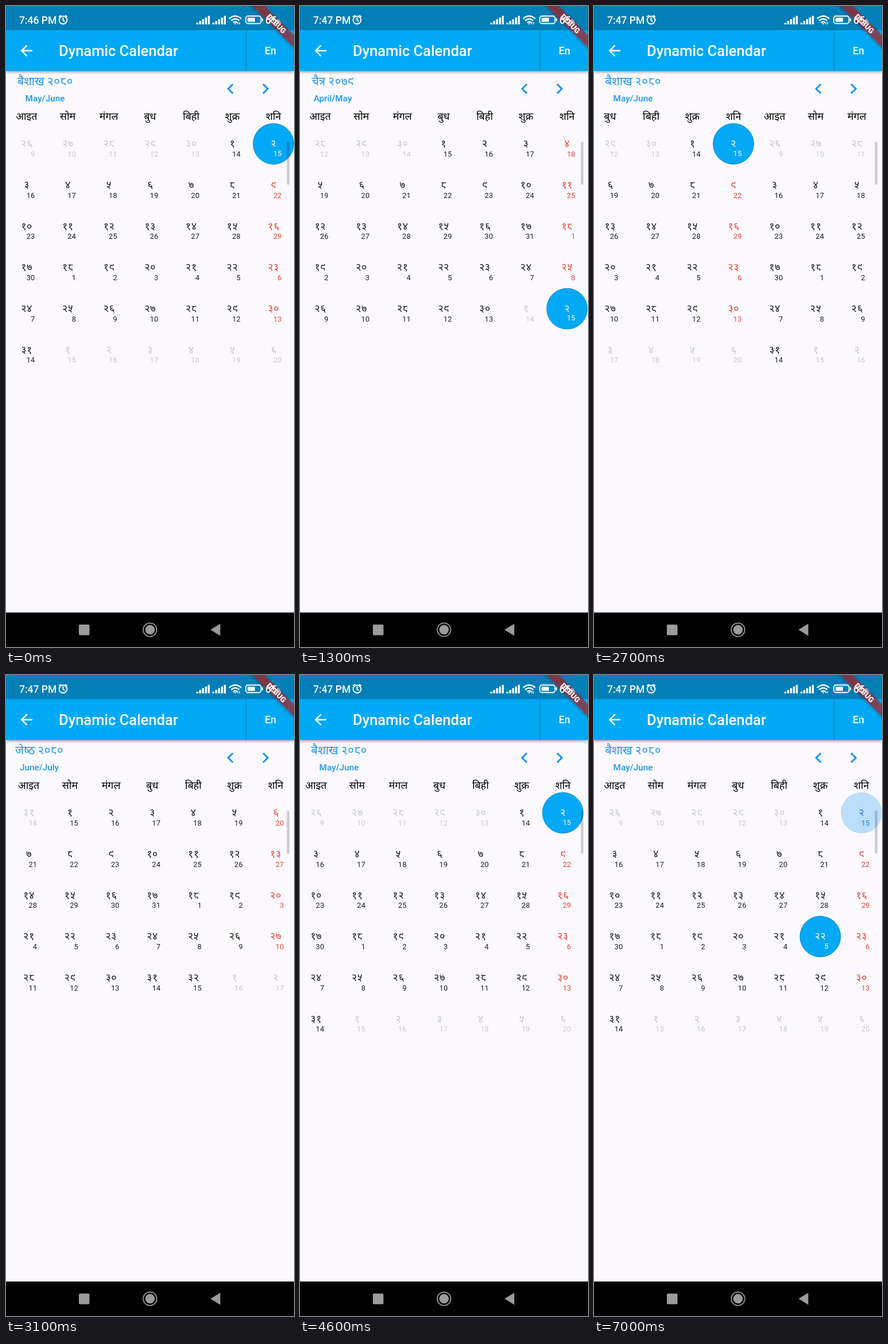
An HTML page for the animation above (8 s loop, 502 px wide and 1115 px high).

```html
<!DOCTYPE html>
<html lang="ne">
<head>
<meta charset="utf-8">
<style>
html, body { margin: 0; width: 100%; height: 100%; overflow: hidden; background: #fbf9fd; }
svg { display: block; width: 502px; height: 1115px; font-family: Roboto, "Noto Sans Devanagari", "Noto Sans", sans-serif; }
.mid, .day { text-anchor: middle; }
.day { font-size: 17.9px; }
.date { font-size: 12.8px; text-anchor: end; letter-spacing: .2px; }
.medium { font-weight: 500; }
.dark { fill: #1c1c1e; }
.faded { fill: #c9c8cb; }
.red { fill: #e8443a; }
.white { fill: #fff; }
.today { fill: #1976d2; }
</style>
</head>
<body>
<svg viewBox="0 0 502 1115">
  <defs>
    <filter id="shadow" x="-20%" y="-40%" width="140%" height="200%"><feDropShadow dx="0" dy="2" stdDeviation="2.5" flood-opacity=".4"/></filter>
    <g id="bars"><path d="M1.5 32v-3M6.5 32v-6M11.5 32v-9M16.500 32v-12M21.500 32v-15" stroke="#fff" stroke-width="3.4"/></g>
  </defs>
  <rect width="502" height="1115" fill="#fbf9fd"/>
  <g id="pager"></g>
  <rect x="489.500" y="236" width="4.500" height="75" rx="2" fill="#000" fill-opacity=".18"/>

  <g fill="#2196f3" class="mid">
    <text id="title" y="138" font-size="20.4"></text>
    <text id="span" y="165.500" font-size="15.3" class="medium"></text>
    <path transform="translate(372.600 125.400) scale(1.55)" d="M15.410 7.410L14 6l-6 6 6 6 1.410-1.410L10.830 12z"/>
    <path transform="translate(433.700 125.400) scale(1.55)" d="M10 6L8.590 7.410 13.170 12l-4.580 4.590L10 18l6-6z"/>
  </g>

  <rect y="0" width="502" height="113" fill="#03a9f4" filter="url(#shadow)"/>
  <g id="app-bar">
    <svg y="42" width="502" height="71" viewBox="0 42 502 71">
      <rect x="420" y="42" width="90" height="71" rx="2" fill="#03a9f4" filter="url(#shadow)"/>
    </svg>
    <rect width="502" height="42" fill="#027fb7"/>
    <path class="white" transform="translate(20.400 62.400) scale(1.278)" d="M20 11H7.830l5.590-5.590L12 4l-8 8 8 8 1.410-1.410L7.830 13H20z"/>
    <text x="92" y="87" font-size="25.56" class="medium white">Dynamic Calendar</text>
    <text x="461" y="84" font-size="17.9" class="medium white mid">En</text>
  </g>

  <g transform="translate(502 0) rotate(45)">
    <rect x="-60" y="35.800" width="120" height="15.3" fill="#b71c1c" fill-opacity=".63" filter="url(#shadow)"/>
    <text y="48" font-size="13" font-weight="900" class="white mid">DEBUG</text>
  </g>

  <g id="status" fill="none" stroke="#fff" stroke-width="2">
    <text id="clock" x="23" y="31" font-size="17.5" class="medium white" stroke="none"></text>
    <circle cx="99.500" cy="24.500" r="6.800"/>
    <path d="M99.500 20v5l3 2M92 19l4-3M107 19l-4-3"/>
    <use href="#bars" x="332"/><use href="#bars" x="360"/>
    <path d="M389 22q10.500-9 21 0M392.500 25.500q7-6 14 0M396 29q3.500-3 7 0" stroke-width="2.400"/>
    <path d="M397.500 30h4l-2 2.500z" fill="#fff" stroke="none"/>
    <path d="M404 32v-4M407 28v4" stroke-width="1.300"/>
    <rect x="418" y="17.500" width="26.500" height="13" rx="3.500" stroke-width="1.800"/>
    <rect x="421" y="20.500" width="13" height="7" rx="1" fill="#fff" stroke="none"/>
    <path d="M447 21.500v5"/>
    <text x="452" y="31" font-size="17.5" class="medium white" stroke="none">65<tspan font-size="10">%</tspan></text>
  </g>

  <rect y="1055" width="502" height="60"/>
  <g fill="#9b9b9b">
    <rect x="127" y="1076" width="18.500" height="18.500" rx="2"/>
    <circle cx="251" cy="1085" r="8.300"/>
    <circle cx="251" cy="1085" r="11.700" fill="none" stroke="#9b9b9b" stroke-width="1.800"/>
    <path d="M356.500 1085l17-10.500v21z"/>
  </g>
</svg>
<script>
const LOOP = 8000, WIDTH = 502, CELL = WIDTH / 7;
const WEEKDAYS = ["आइत", "सोम", "मंगल", "बुध", "बिही", "शुक्र", "शनि"];
const MONTHS = [
  { title: "चैत्र २०७९", span: "April/May", center: 57, lead: 3, prevLast: 30, days: 30, cells: 35, date: 12, wrap: 31, today: 34 },
  { title: "बैशाख २०८०", span: "May/June", center: 68, lead: 5, prevLast: 30, days: 31, cells: 42, date: 9, wrap: 30, today: 6, pick: 26 },
  { title: "जेष्ठ २०८०", span: "June/July", center: 58, lead: 1, prevLast: 31, days: 32, cells: 35, date: 14, wrap: 31 }
];
// Each swipe: finger down, release (ms), page before, page after.
const SWIPES = [[50, 596, 1, 0], [1920, 1985, 0, 1], [2610, 2696, 1, 2], [4122, 4232, 2, 1]];
const DRAG = 0.4, SLOW = 9.1, FAST = 22;
const PICK_START = 6120, PICK_END = 6290, MINUTE = 600;

const $ = id => document.getElementById(id);
const nepali = n => String(n).replace(/\d/g, d => String.fromCharCode(0x966 + +d));
const text = (x, y, cls, str) => `<text x="${x.toFixed(2)}" y="${y.toFixed(2)}" class="${cls}">${str}</text>`;
const columnX = c => (c + 0.5) * CELL;

function cellText(x, y, day, date, color, lift = 0) {
  return text(x, y + 5.5, "day " + color, nepali(day)) + text(x + 14.6, y + 22 - lift, "date " + color, date);
}

function monthMarkup(m) {
  let out = WEEKDAYS.map((w, c) => text(columnX(c), 198, "day medium", w)).join("");
  for (let i = 0; i < m.cells; i++) {
    const x = columnX(i % 7), y = 239.8 + Math.floor(i / 7) * 71.7;
    const n = i - m.lead + 1, inside = n > 0 && n <= m.days;
    const day = n < 1 ? m.prevLast + n : inside ? n : n - m.days;
    const date = (m.date + i - 1) % m.wrap + 1;
    const disc = (r, attrs) => `<circle cx="${x}" cy="${y}" r="${r}" ${attrs}/>`;
    const cell = (color, lift) => cellText(x, y, day, date, color, lift);
    const selected = disc(35.4, 'fill="#03a9f4" stroke="#0288d1"') + cell("white", 1.2);
    if (i === m.today) {
      out += `<g class="before">${selected}</g><g class="after">${disc(35.8, 'fill="#bbdefb"')}${cell("today")}</g>`;
    } else {
      out += cell(!inside ? "faded" : i % 7 === 6 ? "red" : "dark");
      if (i === m.pick) out += `<g class="after">${selected}</g>`;
    }
  }
  return out;
}

// Neighbouring pages repeat the focused month while sliding.
$("pager").innerHTML = MONTHS.map((m, i) =>
  `<g class="month"><g id="month${i}">${monthMarkup(m)}</g>` +
  `<use href="#month${i}" x="${-WIDTH}"/><use href="#month${i}" x="${WIDTH}"/></g>`).join("");
const pages = [...document.querySelectorAll(".month")];
const before = document.querySelectorAll(".before"), after = document.querySelectorAll(".after");

// Accelerating drag, then an overdamped spring to the next page.
function swipeProgress(t, down, up) {
  const length = up - down;
  if (t < up) return DRAG * ((t - down) / length) ** 2;
  const s = (t - up) / 1000, rest = 1 - DRAG, speed = 2000 * DRAG / length;
  const a = (FAST * rest - speed) / (FAST - SLOW);
  return 1 - a * Math.exp(-SLOW * s) - (rest - a) * Math.exp(-FAST * s);
}

function position(t) {
  const swipe = SWIPES.filter(s => t >= s[0]).pop();
  if (!swipe) return 1;
  const [down, up, from, to] = swipe;
  return from + (to - from) * swipeProgress(t, down, up);
}

function render(now) {
  const t = now % LOOP, pos = position(t), focus = Math.round(pos), month = MONTHS[focus];
  pages.forEach((page, i) => {
    page.style.display = i === focus ? "" : "none";
    page.setAttribute("transform", `translate(${((focus - pos) * WIDTH).toFixed(2)} 0)`);
  });
  for (const [id, str] of [["title", month.title], ["span", month.span]]) {
    $(id).textContent = str;
    $(id).setAttribute("x", month.center);
  }
  $("clock").textContent = t < MINUTE ? "7:46 PM" : "7:47 PM";
  const picked = Math.min(1, Math.max(0, (t - PICK_START) / (PICK_END - PICK_START)));
  before.forEach(g => g.style.opacity = 1 - picked);
  after.forEach(g => g.style.opacity = picked);
  requestAnimationFrame(render);
}
requestAnimationFrame(render);
</script>
</body>
</html>
```
